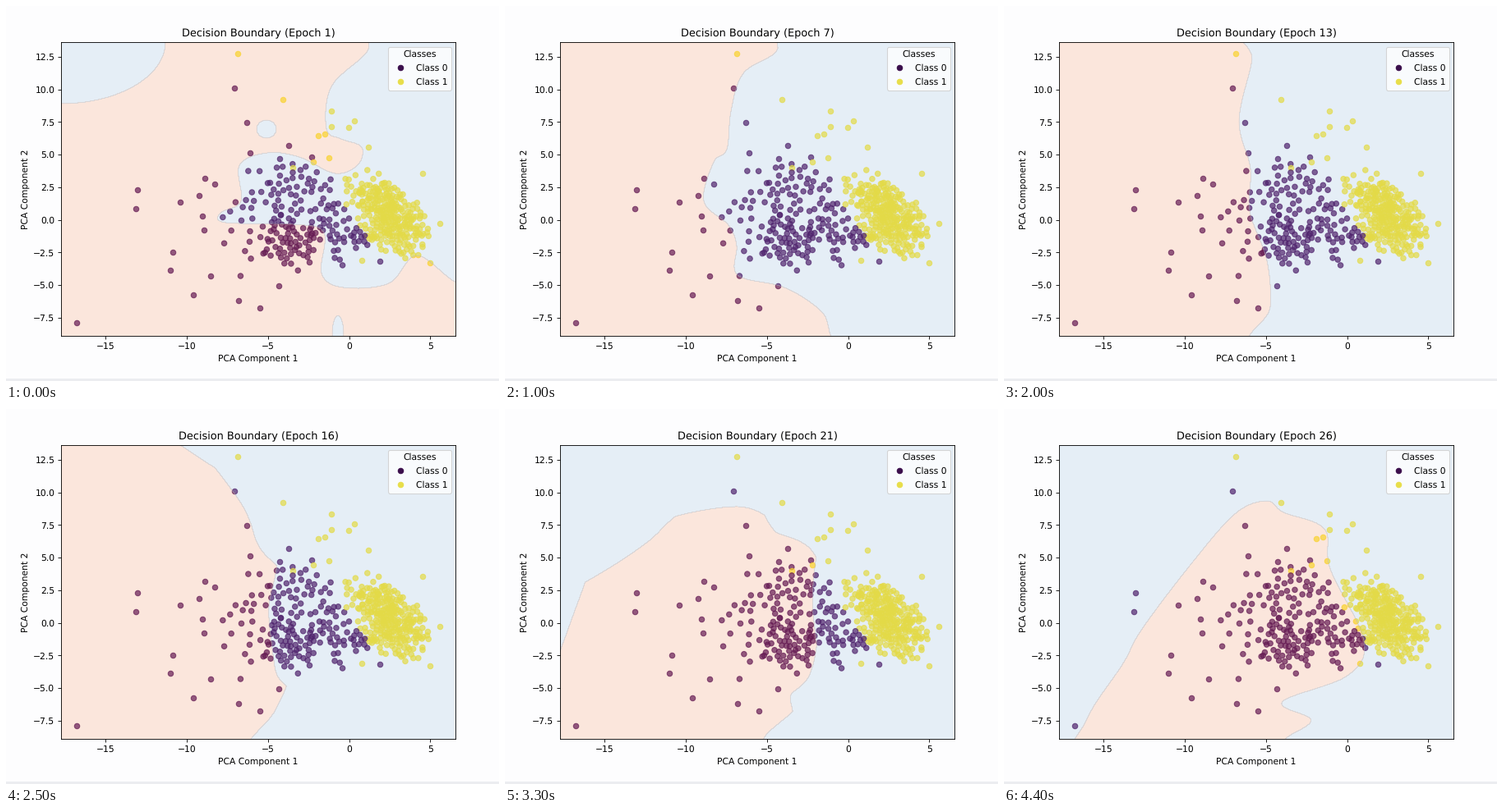
These frames come from a looping animation (600 by 457 pixels, 4500 ms). A matplotlib script:

```python
import numpy as np
import matplotlib.pyplot as plt
from matplotlib.animation import FuncAnimation
from matplotlib.lines import Line2D
from matplotlib.patches import Rectangle

W, H, DPI = 600, 457, 64
K = 77.5 / DPI                      # one typographic point at this dpi
LEFT, RIGHT, TOP, BOTTOM = 66.9, 547.2, 44.2, 402.3
FRAMES, INTERVAL, LAST_EPOCH = 45, 100, 26

PURPLE, YELLOW = "#440154", "#fde725"
PINK, BLUE = "#eb8250", "#7daad2"

plt.rcParams.update({
    "font.family": "DejaVu Sans",
    "font.size": 10 * K,
    "text.hinting": "no_hinting",
    "axes.titlepad": 6 * K,
    "axes.labelpad": 4 * K,
    "axes.linewidth": 0.8 * K,
    "lines.linewidth": 1.5 * K,
    "patch.linewidth": K,
})
for axis in ("xtick", "ytick"):
    plt.rcParams.update({
        f"{axis}.major.size": 3.5 * K,
        f"{axis}.major.pad": 3.5 * K,
        f"{axis}.major.width": 0.8 * K,
    })

rng = np.random.default_rng(7)


def to_data(px, py):
    """Stage pixels to PCA coordinates."""
    return (np.asarray(px) - 417.6) / 19.76, (260.6 - np.asarray(py)) / 15.9


# ---- samples -------------------------------------------------------------

def cloud(n, cx, cy, sx, sy, slope=0.0, gap=4.0, reach=2.2):
    """Gaussian cloud without far tails, its points at least gap apart."""
    pts = []
    while len(pts) < n:
        u, v = rng.normal(size=2)
        p = np.array([cx + sx * u, cy + sy * v + slope * sx * u])
        if np.hypot(u, v) < reach and all(np.hypot(*(p - q)) > gap
                                          for q in pts):
            pts.append(p)
    return np.array(pts)


far_purple = [
    (86, 386), (200, 322), (203, 300), (228, 352), (249, 329), (283, 359),
    (309, 368), (158, 247), (160, 224), (212, 239), (235, 231), (242, 210),
    (254, 217), (239, 256), (241, 273), (278, 100), (293, 142), (297, 179),
    (333, 186), (344, 170), (372, 184), (332, 341), (455, 311),
]
far_yellow = [
    (282, 58), (337, 114), (396, 128), (424, 140), (417, 148), (396, 147),
    (380, 158), (388, 156), (441, 172), (393, 185), (374, 190), (349, 197),
    (507, 204), (528, 265), (433, 310), (516, 313),
]
purple = np.vstack([
    np.add(far_purple, 0.5),
    cloud(26, 297, 265, 18, 32, gap=9),
    cloud(62, 347, 288, 18, 17),
    cloud(42, 355, 230, 21, 18, gap=6),
    cloud(36, 396, 270, 15, 20, 0.5),
    cloud(12, 429, 284, 7, 11, 0.8),
])
yellow = np.vstack([
    np.add(far_yellow, 0.5),
    cloud(235, 471, 261, 21, 20, 0.35, gap=2.5),
    cloud(35, 438, 232, 18, 15, gap=4),
])
samples = np.vstack([purple, yellow])
colors = np.array([PURPLE] * len(purple) + [YELLOW] * len(yellow))
order = rng.permutation(len(samples))


# ---- decision regions ----------------------------------------------------

gx, gy = np.meshgrid(np.linspace(LEFT, RIGHT, 200),
                     np.linspace(TOP, BOTTOM, 150))


def smooth(loop, steps=8):
    """Closed Catmull-Rom curve through the points of a loop."""
    p = np.array(loop, float)
    t = (np.arange(steps) / steps)[None, :, None]
    a, b, c, d = (np.roll(p, s, 0)[:, None, :] for s in (1, 0, -1, -2))
    curve = 0.5 * (2 * b + (c - a) * t + (2 * a - 5 * b + 4 * c - d) * t ** 2
                   + (3 * b - a - 3 * c + d) * t ** 3)
    return curve.reshape(-1, 2)


def region(*loop):
    """Signed distance to a smooth outline, positive inside."""
    dist = np.full(gx.shape, np.inf)
    inside = np.zeros(gx.shape, bool)
    pts = smooth(loop)
    for (x0, y0), (x1, y1) in zip(pts, np.roll(pts, -1, 0)):
        dx, dy = x1 - x0, y1 - y0
        t = ((gx - x0) * dx + (gy - y0) * dy) / (dx * dx + dy * dy + 1e-9)
        t = np.clip(t, 0, 1)
        dist = np.minimum(dist, np.hypot(gx - x0 - t * dx, gy - y0 - t * dy))
        if y0 != y1:
            crosses = (y0 > gy) != (y1 > gy)
            inside ^= crosses & (gx < x0 + (gy - y0) * dx / dy)
    return np.where(inside, dist, -dist)


def ellipse(cx, cy, rx, ry):
    return (1 - np.hypot((gx - cx) / rx, (gy - cy) / ry)) * min(rx, ry)


def union(*fields):
    return np.maximum.reduce(fields)


# Fields at some epochs, positive where the model predicts the blue class.
KEYS = {
    1: union(
        ellipse(67, 44, 127, 75), ellipse(317, 150, 12, 11),
        ellipse(404, 400, 7, 23),
        region((448, 20), (440, 55), (396, 98), (390, 150), (408, 162),
               (433, 172), (428, 194), (400, 204), (357, 184), (318, 179),
               (284, 194), (286, 238), (261, 252), (267, 264), (350, 266),
               (387, 276), (384, 326), (410, 343), (466, 338), (500, 304),
               (548, 337), (590, 345), (590, 20))),
    3: union(
        ellipse(125, 44, 26, 41),
        region((430, 20), (398, 56), (352, 96), (322, 113), (280, 124),
               (270, 167), (247, 195), (252, 217), (233, 254), (272, 303),
               (237, 345), (285, 338), (323, 311), (390, 358), (402, 391),
               (451, 397), (500, 390), (517, 379), (550, 402), (590, 415),
               (590, 20))),
    7: region((352, 20), (330, 56), (290, 82), (275, 128), (270, 175),
              (254, 190), (242, 238), (272, 267), (282, 292), (283, 328),
              (340, 343), (386, 373), (420, 420), (590, 420), (590, 20)),
    13: region((303, 20), (302, 65), (286, 140), (300, 198), (299, 250),
               (320, 310), (324, 368), (313, 420), (590, 420), (590, 20)),
    18: -region((40, 70), (70, 102), (102, 139), (150, 128), (172, 108),
                (207, 91), (275, 112), (303, 133), (318, 163), (350, 184),
                (334, 245), (332, 318), (358, 334), (298, 402), (285, 420),
                (40, 420)),
    24: -region((40, 398), (95, 334), (150, 262), (175, 222), (232, 162),
                (285, 121), (322, 118), (336, 134), (385, 149), (412, 180),
                (404, 206), (432, 292), (418, 322), (348, 347), (376, 367),
                (328, 402), (310, 425), (40, 425)),
    26: -region((101, 425), (101, 378), (145, 310), (168, 268), (230, 186),
                (282, 127), (320, 112), (340, 126), (390, 146), (397, 195),
                (438, 282), (418, 325), (338, 357), (374, 379), (342, 402),
                (325, 425)),
}


def field_at(epoch):
    """Blend the two nearest known fields."""
    lo = max(m for m in KEYS if m <= epoch)
    hi = min(m for m in KEYS if m >= epoch)
    f = (epoch - lo) / (hi - lo) if hi > lo else 0
    return (1 - f) * KEYS[lo] + f * KEYS[hi]


# ---- figure --------------------------------------------------------------

fig = plt.figure(figsize=(W / DPI, H / DPI), dpi=DPI, facecolor="#fdfdfe")
ax = fig.add_axes([LEFT / W, 1 - BOTTOM / H,
                   (RIGHT - LEFT) / W, (BOTTOM - TOP) / H])
fig.add_artist(Rectangle((0, 0), 1, 3.5 / H, transform=fig.transFigure,
                         color="#ecedf0", lw=0))

xs, ys = to_data(samples[order, 0], samples[order, 1])
ax.scatter(xs, ys, s=36 * K * K, c=colors[order], alpha=0.7)

(x_lo, x_hi), (y_hi, y_lo) = to_data([LEFT, RIGHT], [TOP, BOTTOM])
ax.set(xlim=(x_lo, x_hi), ylim=(y_lo, y_hi),
       yticks=np.arange(-7.5, 13, 2.5),
       xlabel="PCA Component 1", ylabel="PCA Component 2")
title = ax.set_title("")

handles = [Line2D([], [], ls="", marker="o", ms=6 * K, mew=K, color=c)
           for c in ("#3b0f4c", "#e8de4a")]
ax.legend(handles, ["Class 0", "Class 1"], title="Classes",
          loc="upper right", labelspacing=0.58)

mesh_x, mesh_y = to_data(gx, gy)
shades = []


def update(frame):
    epoch = min(LAST_EPOCH, 1 + int(0.6 * frame + 0.5))
    title.set_text(f"Decision Boundary (Epoch {epoch})")
    while shades:
        shades.pop().remove()
    field = field_at(epoch)
    shades.append(ax.contourf(mesh_x, mesh_y, field, levels=[-1e4, 0, 1e4],
                              colors=[PINK, BLUE], alpha=0.2, zorder=2))
    shades.append(ax.contour(mesh_x, mesh_y, field, levels=[0],
                             colors="#c4ccd0", alpha=0.4,
                             linewidths=0.6 * K, zorder=2))
    return [title]


anim = FuncAnimation(fig, update, frames=FRAMES, interval=INTERVAL,
                     init_func=lambda: [title], repeat=True, repeat_delay=0)
plt.show()
```
